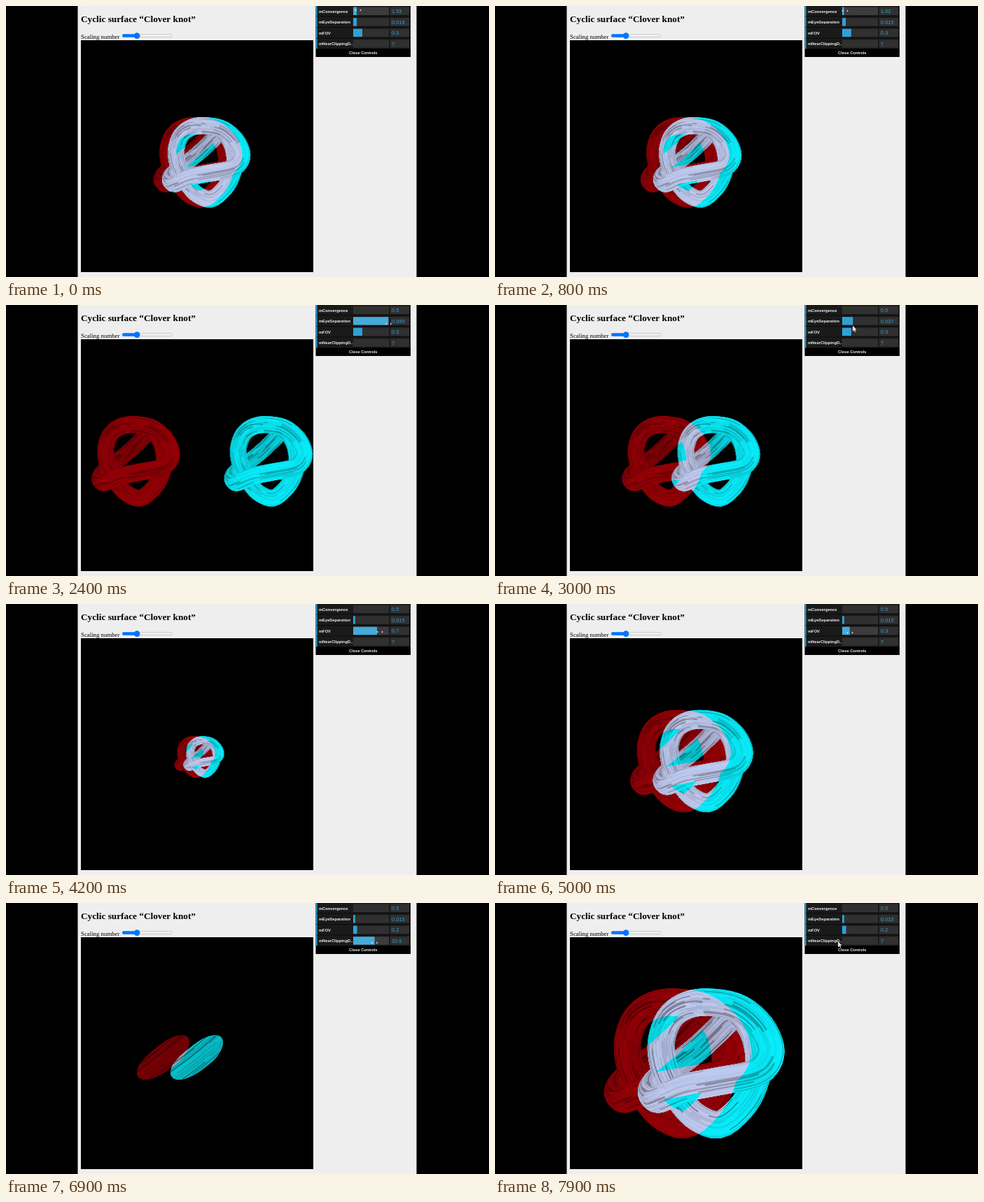
Animation of 690 by 388 pixels, one loop 8000 ms. Source, as an HTML page with a canvas:

```html
<!DOCTYPE html>
<html lang="en">
<head>
<meta charset="utf-8">
<title>Clover knot</title>
<style>
html, body { margin: 0; width: 100%; height: 100%; overflow: hidden; background: #000; }
canvas { display: block; }
</style>
</head>
<body>
<canvas id="stage" width="690" height="388"></canvas>
<script>
const W = 690, H = 388, LOOP = 8000, STEP = 100;
const ctx = document.getElementById('stage').getContext('2d');
const VIEW = { x: 107, y: 49, size: 332, cx: 273, cy: 215 };
const UNIT = 167, RADIUS = 19, CAMERA = 10;
const SANS = '"Liberation Sans", Arial, sans-serif';
const SERIF = '"Liberation Serif", "Times New Roman", serif';

// Centre line of the tube: x, y, depth
const PATH = [
  [6, -73, -17], [48, -66, -28], [80, -42, -34], [96, -10, -34], [92, 14, -40],
  [72, 30, -45], [18, 41, -55], [-22, 49, -48], [-48, 60, -25], [-66, 66, 5],
  [-74, 54, 40], [-62, 36, 77], [-24, 7, 97], [0, -13, 87], [23, -35, 68],
  [48, -56, 42], [70, -34, 25], [80, 5, 12], [75, 40, 2], [58, 74, -8],
  [25, 102, -15], [-7, 93, -10], [-30, 70, 0], [-48, 40, 8], [-58, 10, 15],
  [-59, -20, 18], [-47, -51, 10], [-24, -68, -2]
];

// Keys: time, value(s)
const CONVERGENCE = [[500, 1.53], [1100, 0.5]];
const SEPARATION = [[1800, 0.019], [2450, 0.1], [3000, 0.037], [3250, 0.015]];
const FOV = [[3700, 0.328], [4200, 0.7], [4350, 0.76], [5000, 0.29], [5300, 0.198]];
const NEAR = [[5700, 7], [5900, 8.2], [6450, 10.9], [6650, 10.9], [6900, 10.6], [7400, 7]];
const POINTER = [
  [0, 503, 6], [500, 503, 6], [1100, 497, 8], [1400, 498, 13], [1800, 507, 27],
  [2450, 547, 27], [3000, 511, 29.5], [3250, 499, 30], [3700, 509, 39],
  [4200, 534, 40], [4350, 538, 40], [5000, 507, 41], [5300, 501.5, 41],
  [5700, 497, 57], [5900, 505.5, 57], [6450, 529, 57], [6650, 529, 57],
  [6900, 526.5, 57], [7400, 497, 57], [7900, 490, 55]
];

function track(keys, t, col = 1) {
  if (t <= keys[0][0]) return keys[0][col];
  for (let i = 1; i < keys.length; i++) {
    const a = keys[i - 1], b = keys[i];
    if (t < b[0]) {
      const u = (t - a[0]) / (b[0] - a[0]);
      return a[col] + (b[col] - a[col]) * u * u * (3 - 2 * u);
    }
  }
  return keys[keys.length - 1][col];
}

const dot = (a, b) => a[0] * b[0] + a[1] * b[1] + a[2] * b[2];
const mix = (a, b, k) => a.map((v, i) => v + b[i] * k);
const unit = a => a.map(v => v / Math.sqrt(dot(a, a)));
const cross = (a, b) => [
  a[1] * b[2] - a[2] * b[1], a[2] * b[0] - a[0] * b[2], a[0] * b[1] - a[1] * b[0]
];
const hash = (a, b) => {
  const v = Math.sin(a * 127.1 + b * 311.7) * 43758.5453;
  return v - Math.floor(v);
};

function pathPoint(u) {
  const n = PATH.length, i = Math.floor(u * n), f = u * n - i;
  const [p, q, r, s] = [-1, 0, 1, 2].map(k => PATH[(i + k + n) % n]);
  return q.map((v, k) => v + 0.5 * f * (r[k] - p[k] +
    f * (2 * p[k] - 5 * v + 4 * r[k] - s[k] + f * (3 * (v - r[k]) + s[k] - p[k]))));
}

function buildTube(along, around) {
  const rings = [], quads = [];
  let normal = [0.3, 0.2, 1];
  for (let i = 0; i < along; i++) {
    const p = pathPoint(i / along);
    const next = pathPoint(((i + 0.2) / along) % 1);
    const dir = unit(mix(next, p, -1));
    normal = unit(mix(normal, dir, -dot(normal, dir)));
    const side = cross(dir, normal);
    const r = RADIUS * CAMERA / (CAMERA + p[2] / UNIT);
    rings.push(Array.from({ length: around }, (_, j) => {
      const a = j / around * 2 * Math.PI;
      return mix(mix(p, normal, r * Math.cos(a)), side, r * Math.sin(a));
    }));
  }
  // A closed tube needs its last ring matched to the first one's rotation
  const last = rings[along - 1], first = rings[0];
  let shift = 0, best = Infinity;
  for (let k = 0; k < around; k++) {
    const d = mix(last[k], first[0], -1);
    if (dot(d, d) < best) { best = dot(d, d); shift = k; }
  }
  for (let i = 0; i < along; i++) {
    for (let j = 0; j < around; j++) {
      const k = (j + 1) % around, wrap = i === along - 1;
      const b = rings[(i + 1) % along];
      const at = m => wrap ? b[(m - shift + around) % around] : b[m];
      const pts = [rings[i][j], rings[i][k], at(k), at(j)];
      const z = pts.reduce((sum, v) => sum + v[2], 0) / 4;
      const grain = hash(j, Math.floor((i + 9 * hash(j, 3)) / 6));
      const light = 0.9 - z * 0.0012 + (grain - 0.5) * 0.2 - (grain < 0.14 ? 0.2 : 0);
      quads.push({ pts, z, gray: Math.round(255 * Math.min(1, light)) });
    }
  }
  return quads.sort((a, b) => b.z - a.z);
}

function clipNear(pts, z) {
  if (pts.every(p => p[2] >= z)) return pts;
  const out = [];
  pts.forEach((p, i) => {
    const q = pts[(i + 1) % pts.length];
    if (p[2] >= z) out.push(p);
    if ((p[2] >= z) !== (q[2] >= z)) {
      out.push(mix(p, mix(q, p, -1), (z - p[2]) / (q[2] - p[2])));
    }
  });
  return out;
}

const tube = buildTube(120, 56);
const layer = () => {
  const c = document.createElement('canvas');
  c.width = c.height = VIEW.size;
  return c.getContext('2d');
};
const knot = layer(), red = layer(), cyan = layer(), pale = layer(), both = layer();
let drawn = '';

function tint(target, color) {
  const s = VIEW.size;
  target.globalCompositeOperation = 'copy';
  target.drawImage(knot.canvas, 0, 0);
  target.globalCompositeOperation = 'multiply';
  target.fillStyle = color;
  target.fillRect(0, 0, s, s);
  target.globalCompositeOperation = 'destination-in';
  target.drawImage(knot.canvas, 0, 0);
}

function renderKnot(scale, near) {
  const key = scale + '/' + near;
  if (key === drawn) return;
  drawn = key;
  const mid = VIEW.size / 2, cut = (near - CAMERA) * UNIT;
  knot.clearRect(0, 0, VIEW.size, VIEW.size);
  knot.lineWidth = 0.5;
  for (const quad of tube) {
    const pts = clipNear(quad.pts, cut);
    if (pts.length < 3) continue;
    knot.fillStyle = knot.strokeStyle = `rgb(${quad.gray},${quad.gray},${quad.gray})`;
    knot.beginPath();
    for (const p of pts) knot.lineTo(mid + p[0] * scale, mid + p[1] * scale);
    knot.closePath();
    knot.fill();
    knot.stroke();
  }
  tint(red, 'rgb(148,0,5)');
  tint(cyan, 'rgb(8,236,250)');
  tint(pale, 'rgb(202,194,236)');
}

function drawAnaglyph(v) {
  const scale = Math.tan(0.099) / Math.tan(v.fov / 2);
  const gap = 48 * scale * (v.separation / 0.015) * (0.5 / v.convergence);
  renderKnot(scale, v.near);
  both.globalCompositeOperation = 'copy';
  both.drawImage(pale.canvas, gap / 2, 0);
  both.globalCompositeOperation = 'destination-in';
  both.drawImage(knot.canvas, -gap / 2, 0);

  const { x, y, size } = VIEW;
  ctx.save();
  ctx.beginPath();
  ctx.rect(x, y, size, size);
  ctx.clip();
  ctx.globalCompositeOperation = 'lighter';
  ctx.drawImage(red.canvas, x - gap / 2, y);
  ctx.drawImage(cyan.canvas, x + gap / 2, y);
  ctx.globalCompositeOperation = 'source-over';
  ctx.globalAlpha = 0.8;
  ctx.drawImage(both.canvas, x, y);
  ctx.restore();
}

function box(x, y, w, h, color) {
  ctx.fillStyle = color;
  ctx.fillRect(x, y, w, h);
}

function label(str, x, y, font, color, align = 'left') {
  ctx.font = font;
  ctx.fillStyle = color;
  ctx.textAlign = align;
  ctx.fillText(str, x, y);
}

function pill(x, y, w, h, color) {
  ctx.fillStyle = color;
  ctx.beginPath();
  ctx.roundRect(x, y, w, h, h / 2);
  ctx.fill();
}

function drawPage() {
  box(0, 0, W, H, '#000');
  box(102.5, 0, 484, H, '#eeeeee');
  label('Cyclic surface “Clover knot”', 107, 23, 'bold 13.27px ' + SERIF, '#000');
  label('Scaling number', 107, 47, '8.8px ' + SERIF, '#000');
  pill(166, 40.3, 71.5, 4.4, '#b2b2b2');
  pill(166.5, 40.8, 70.5, 3.4, '#efefef');
  pill(166, 40.3, 21, 4.4, '#0075ff');
  pill(182.8, 38.3, 8.6, 8.6, '#0075ff');
  box(VIEW.x, VIEW.y, VIEW.size, VIEW.size, '#000');
}

const SLIDER = { x: 496, w: 51, h: 11.4 };
const rowTop = i => -0.4 + i * 15.55;
const onSlider = (i, p) => p.x >= SLIDER.x && p.x <= SLIDER.x + SLIDER.w &&
  p.y >= rowTop(i) + 2 && p.y <= rowTop(i) + 13.6;

function drawPanel(v, pointer) {
  const rows = [
    ['mConvergence', v.convergence, 0.5, 11, 2],
    ['mEyeSeparation', v.separation, 0.01, 0.1, 3],
    ['mFOV', v.fov, 0.1, 1, 1],
    ['mNearClippingD..', v.near, 7, 13, 1]
  ];
  box(442.5, 0, 135.5, 73, '#000');
  rows.forEach(([name, value, min, max, digits], i) => {
    const y = rowTop(i), hot = onSlider(i, pointer);
    box(442.5, y, 135.5, 15, '#1a1a1a');
    box(442.5, y, 2, 15, '#2fa1d6');
    label(name, 447, y + 9.9, 'bold 5.75px ' + SANS, '#eee');
    box(SLIDER.x, y + 2, SLIDER.w, SLIDER.h, hot ? '#3c3c3c' : '#303030');
    box(SLIDER.x, y + 2, SLIDER.w * (value - min) / (max - min), SLIDER.h,
      hot ? '#44abda' : '#2fa1d6');
    box(549, y + 2, 27, SLIDER.h, '#303030');
    label(String(+value.toFixed(digits)), 551, y + 10.7, '7.4px ' + SANS, '#2fa1d6');
  });
  label('Close Controls', 510.3, 69.2, 'bold 5.7px ' + SANS, '#eee', 'center');
}

function shape(points, x, y) {
  ctx.beginPath();
  for (const [dx, dy] of points) ctx.lineTo(x + dx, y + dy);
  ctx.closePath();
  ctx.fill();
}

function drawPointer(p) {
  const resizing = [0, 1, 2, 3].some(i => onSlider(i, p));
  ctx.fillStyle = '#f3dcf6';
  if (resizing) {
    shape([[-4.8, 0], [-2.8, -1.5], [-2.8, 1.5]], p.x, p.y);
    shape([[4.8, 0], [2.8, -1.5], [2.8, 1.5]], p.x, p.y);
  } else {
    shape([[0, 0], [0, 8.2], [1.9, 6.6], [3.2, 9.2], [4.3, 8.7], [3.2, 6.1], [5.6, 6]], p.x, p.y);
  }
}

function frame(now) {
  const t = Math.floor((now % LOOP) / STEP) * STEP;
  const values = {
    convergence: track(CONVERGENCE, t),
    separation: track(SEPARATION, t),
    fov: track(FOV, t),
    near: track(NEAR, t)
  };
  const pointer = { x: track(POINTER, t), y: track(POINTER, t, 2) };
  drawPage();
  drawAnaglyph(values);
  drawPanel(values, pointer);
  drawPointer(pointer);
}

const start = performance.now();
function tick() {
  frame(performance.now() - start);
  requestAnimationFrame(tick);
}
tick();
</script>
</body>
</html>
```
